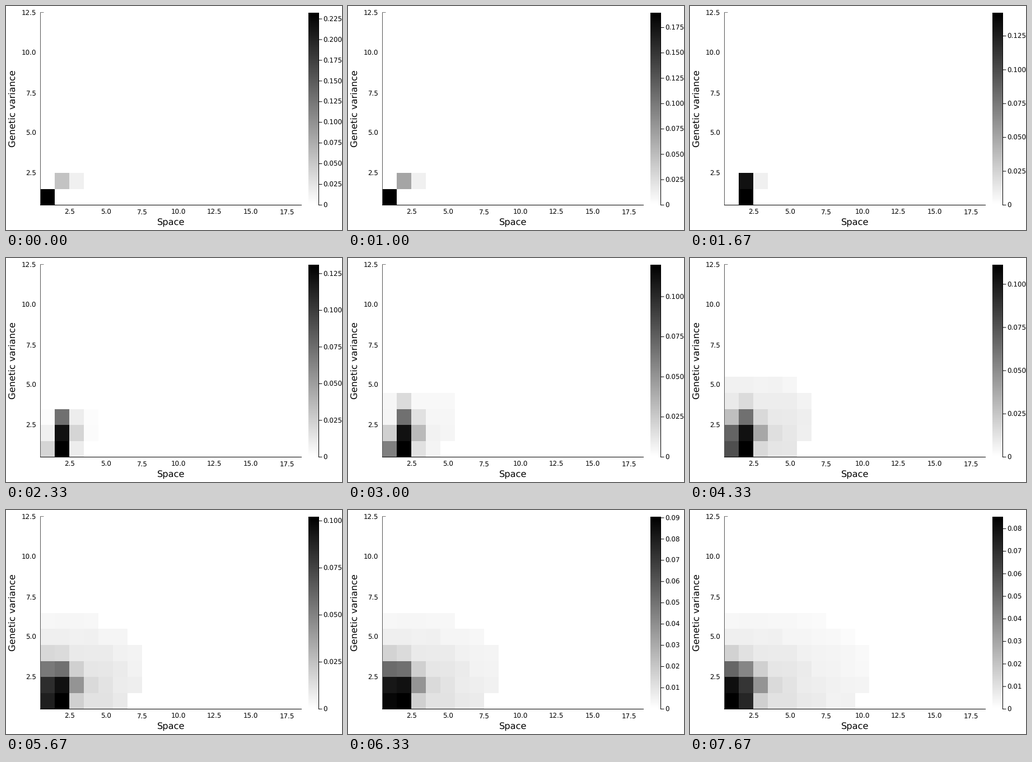
Animation, 600 px wide and 400 px high, one loop 8 s. Source, as a matplotlib script:

```python
import numpy as np
import matplotlib.pyplot as plt
from matplotlib.animation import FuncAnimation

LOOP_MS, INTERVAL, STEPS, DPI = 8000, 40, 24, 100
FRAMES = LOOP_MS // INTERVAL
LEFT, RIGHT, TOP, BOTTOM = 61.5, 527.7, 12, 355.4
COLS, ROWS = 18, 12
BAR_LEFT, BAR_RIGHT = 540, 558
PX = 72 / DPI

plt.rcParams.update({"font.family": "DejaVu Sans", "text.hinting": "none"})

col, row = np.meshgrid(np.arange(COLS), np.arange(ROWS))
grain = np.random.default_rng(4).uniform(.8, 1.1, (ROWS, COLS))


def ease(step, *points):
    """Piecewise linear value through (step, value) points."""
    return np.interp(step, *zip(*points))


def peak_density(step):
    return ease(step, (0, .2325), (4, .1753), (5, .1422), (9, .1199),
                (13, .1113), (17, .1022), (19, .0905), (23, .0853))


def bump(column, height, centre, spread, power):
    """Concentration of individuals along one column."""
    profile = np.exp(-np.abs((row - centre) / spread) ** power)
    return 255 * height * profile * (col == column)


def darkness(step):
    """Spreading population: dense origin, thin tail, advancing front."""
    home = bump(0, ease(step, (6, 0), (9, .5), (19, .97), (23, 1)),
                0, ease(step, (9, 1), (13, 2), (17, 2.5)), 3)
    core = bump(1, ease(step, (3, 0), (5, 1), (19, 1), (23, .85)), 0, 2.4, 3)
    edge = bump(2, ease(step, (5, .06), (9, .27), (17, .42)), 1, 1.1, 2)

    tail = 36 * np.exp(-.05 * row ** 2 - .2 * np.maximum(col - 3, 0))
    tail *= grain * ease(step, (6, 0), (14, 1))
    grid = np.maximum(home + core + edge, tail)

    front = ease(step, (5, 3.3), (9, 5.3), (17, 7.4), (23, 10.3))
    height = ease(step, (5, 2), (9, 4), (17, 6))
    grid[(col + 1 > front - .3 * (row - 2) ** 2) | (row + 1 > height)] = 0

    if step < 5:  # founders still at the origin
        grid[0, 0] = 255
        grid[1, 1] = max(grid[1, 1], 60 + 10 * step)
    return grid


fig = plt.figure(figsize=(6, 4), dpi=DPI, facecolor="white")
ax = fig.add_axes([0, 0, 1, 1])
ax.axis("off")
ax.set(xlim=(0, 600), ylim=(400, 0))


def line(xs, ys, color="black"):
    return ax.plot(xs, ys, color=color, lw=PX, solid_capstyle="butt",
                   snap=False, zorder=3)[0]


def label(x, y, text, size=11.9, **kw):
    return ax.text(x, y, text, fontsize=size * PX, va="baseline", **kw)


def shades(xs, ys, values, top):
    return ax.pcolormesh(xs, ys, values, cmap="gray_r", vmin=0, vmax=top,
                         antialiased=False)


cells = shades(np.round(np.linspace(LEFT, RIGHT, COLS + 1)),
               np.round(np.linspace(BOTTOM, TOP, ROWS + 1)), darkness(0), 255)
shades([BAR_LEFT, BAR_RIGHT], np.linspace(355, TOP, 344),
       np.linspace(0, 1, 343)[:, None], 1)

line([61, 528], [355.5, 355.5])
line([61.5, 61.5], [12, 355], "#555555")
line([61, 67.5], [11.5, 11.5], "#777777")
line([558.5, 558.5], [12, 356])

for v in np.arange(2.5, 18, 2.5):
    label(LEFT + (v - .5) / COLS * (RIGHT - LEFT), 371.4, f"{v:.1f}", ha="center")
for v in np.arange(2.5, 13, 2.5):
    label(54.3, BOTTOM - (v - .5) / ROWS * (BOTTOM - TOP) + 4.5, f"{v:.1f}", ha="right")
label(295, 391.8, "Space", 16.2, ha="center")
ax.text(12.3, 183.5, "Genetic variance", fontsize=16.2 * PX, rotation=90,
        ha="center", va="center")

ticks = [line([558, 564.5], [0, 0]) for _ in range(11)]
tick_labels = [label(566.3, 0, "") for _ in ticks]


def update(frame):
    step = int((frame + .9) * STEPS / FRAMES)
    cells.set_array(darkness(step))
    peak = peak_density(step)
    gap, digits = (.025, 3) if peak >= .1 else (.01, 2)
    for i, (tick, text) in enumerate(zip(ticks, tick_labels)):
        value = i * gap
        tick.set_visible(value <= peak)
        text.set_visible(value <= peak)
        y = BOTTOM - value / peak * (BOTTOM - TOP)
        tick.set_ydata([y, y])
        text.set_y(y + 4.5)
        text.set_text(f"{value:.{digits}f}" if i else "0")
    return [cells, *ticks, *tick_labels]


anim = FuncAnimation(fig, update, frames=FRAMES, interval=INTERVAL,
                     repeat=True, repeat_delay=0)
plt.show()
```
